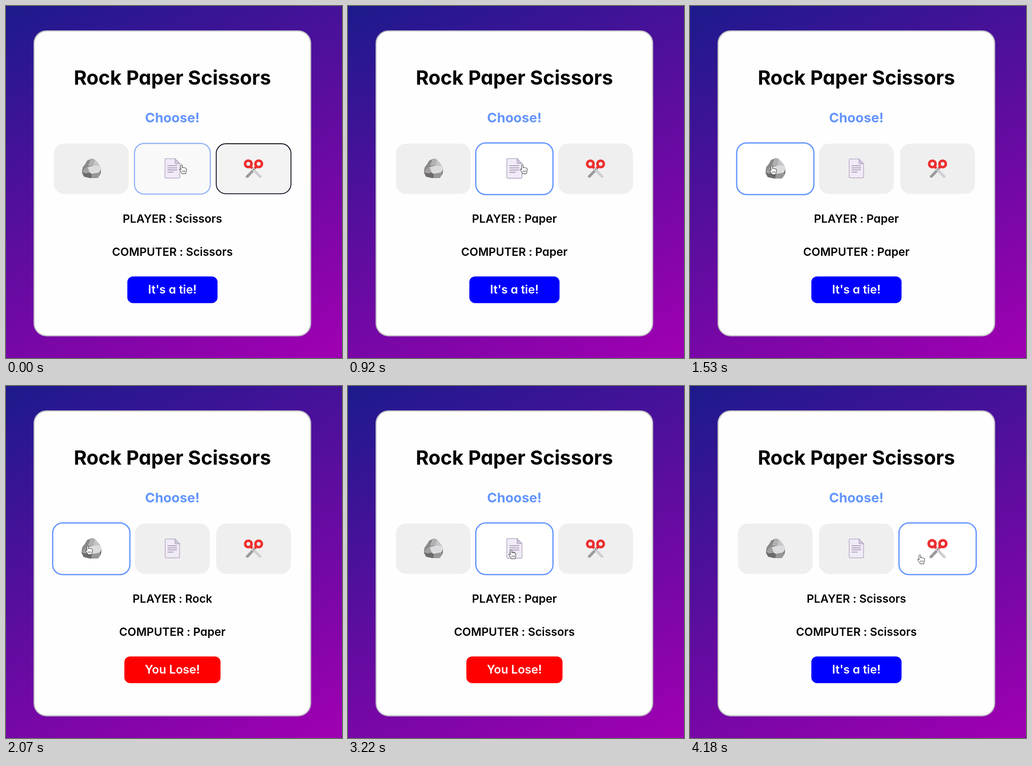
An HTML page for the animation above (5250 ms loop, 732 by 765 pixels).

```html
<!DOCTYPE html>
<html lang="en">
<head>
<meta charset="utf-8">
<title>Rock Paper Scissors</title>
<style>
  html, body { margin: 0; width: 100%; height: 100%; overflow: hidden; }
  svg { display: block; width: 100%; height: 100%; }
  text {
    font-family: Inter, "Open Sans", sans-serif;
    font-optical-sizing: none;
    font-feature-settings: "cv11" 1, "calt" 0;
    font-weight: 600;
    font-size: 24.6px;
    text-anchor: middle;
  }
  .title { font-size: 42.9px; font-weight: 700; }
  .sub { font-size: 29.1px; font-weight: 700; fill: #6495ff; }
  .label { font-size: 25.4px; fill: #fff; }
</style>
</head>
<body>
<svg viewBox="0 0 732 765">
  <defs>
    <linearGradient id="bg" gradientUnits="userSpaceOnUse" x1="154" y1="-72" x2="578" y2="837">
      <stop offset="0" stop-color="#1c1a8d"/>
      <stop offset=".96" stop-color="#9c00b0"/>
    </linearGradient>
  </defs>
  <rect width="732" height="765" fill="url(#bg)"/>
  <rect x="61.3" y="54.3" width="602.3" height="662.3" rx="27" fill="#fefefe" stroke="#c4c4c8" stroke-width="2.6"/>
  <text class="title" x="362.5" y="171">Rock Paper Scissors</text>
  <text class="sub" x="362.5" y="253">Choose!</text>

  <g id="rock">
    <rect class="box"/>
    <g transform="translate(-185.8 -353.7)">
      <path fill="#6c6a6a" d="M165.500 362L167 351L173 343L177 336L187 331.500L193 333.500L204 346L207 355L206 365L200 373.500L183 374L170 371Z"/>
      <path fill="#8b8989" d="M167 351L173 343L177 336L183 333.500L178 347L168 358Z"/>
      <path fill="#a3a1a1" d="M166 361L168 357L178 348L182 362L173 364Z"/>
      <path fill="#b2b1b2" d="M178 348L184 333L187 331.500L193 333.500L190 347Z"/>
      <path fill="#c6c5c7" d="M193 333.500L204 346L190 347Z"/>
      <path fill="#dcdbde" d="M190 347L204 346L207 355L203 362L187 365L182 362L178 350Z"/>
      <path fill="#989696" d="M187 365L203 362L206 365L200 373.500L186 374Z"/>
    </g>
  </g>

  <g id="paper">
    <rect class="box"/>
    <g transform="translate(-362.5 -353.7)" stroke="#b6abc2" stroke-width="1.5">
      <path fill="#f1ebf8" d="M349 332.500H368L378.200 343V371.200Q378.200 373.400 376 373.400H349Q346.800 373.400 346.800 371.200V334.700Q346.800 332.500 349 332.500Z"/>
      <path fill="#d2c8dd" d="M368 332.500V341Q368 343 370 343H378.200Z"/>
      <path stroke="#988ca5" d="M352 347.300H372.500M352 351.800H372.500M352 356.300H372.500M352 361H365"/>
    </g>
  </g>

  <g id="scissors">
    <rect class="box"/>
    <rect id="ring" x="-80.5" y="-53.800" width="161" height="107.600" rx="21" fill="none" stroke="#141418" stroke-width="1.800"/>
    <g transform="translate(-539.4 -353.7)">
      <path fill="#9b9a9c" d="M540.500 351L544 355.500L527.500 373H523L522.500 369.500Z"/>
      <path fill="#d0cfd2" d="M538.300 351L535 355.500L551.500 373H556L556.500 369.500Z"/>
      <g fill="none" stroke="#ee2f2f" stroke-width="5.600">
        <circle cx="528" cy="343.200" r="7"/>
        <circle cx="550.400" cy="343.200" r="7"/>
        <path d="M531 347L536.500 352.500M547.500 347L542 352.500"/>
      </g>
      <circle cx="539.300" cy="355" r="1.500" fill="#77767a"/>
    </g>
  </g>

  <text id="player" x="362.5" y="470.500"></text>
  <text id="computer" x="362.5" y="542.500"></text>
  <rect id="badge" y="587.700" height="58" rx="12.500"/>
  <text id="result" class="label" x="362.5" y="625"></text>

  <g id="hand" stroke="#222" stroke-width="1" stroke-linejoin="round" stroke-linecap="round">
    <path fill="#fff" d="M-4.600 -8.300C-4.600 -10.700 -1 -10.700 -1 -8.300V-3.200C-.7 -4.800 2 -4.600 2.200 -2.900C2.600 -4.100 5 -3.900 5.200 -2.300C5.700 -3.300 7.400 -3 7.400 -1.300V3.500C7.400 5.500 6.200 6.800 6 9.500H-2.200C-2.600 6.800 -6.800 3.200 -7.600 .6C-8.200 -1.200 -6 -1.600 -4.600 .8Z"/>
    <path fill="none" stroke-width=".8" d="M-1 2.500V6M1.700 2.500V6M4.400 2.500V6"/>
  </g>
</svg>
<script>
const LOOP = 5250, FADE = 200;
const $ = id => document.getElementById(id);
const set = (el, attrs) => { for (const k in attrs) el.setAttribute(k, attrs[k]); };
const mix = (a, b, p) => a + (b - a) * p;
const blend = (a, b, p) => `rgb(${a.map((v, i) => Math.round(mix(v, b[i], p)))})`;
const clamp = x => Math.max(0, Math.min(1, x));

// cubic-bezier(.25, .1, .25, 1)
function ease(x) {
  if (x <= 0) return 0;
  if (x >= 1) return 1;
  const curve = (a, b, s) => 3 * a * s * (1 - s) ** 2 + 3 * b * s * s * (1 - s) + s ** 3;
  let lo = 0, hi = 1;
  for (let i = 0; i < 24; i++) {
    const mid = (lo + hi) / 2;
    if (curve(.25, .25, mid) < x) lo = mid; else hi = mid;
  }
  return curve(.1, 1, lo);
}

const GREY = [239, 239, 239], WHITE = [255, 255, 255], BLUE = [100, 149, 255];

// hover spans: [enter, leave]
const buttons = [
  { id: "rock", x: 185.8, spans: [[1248, 2440]] },
  { id: "paper", x: 362.5, spans: [[-72, 1230], [2440, 3652]] },
  { id: "scissors", x: 539.4, spans: [[-999, -92], [3655, 9999]] }
];

// pointer legs: start, end, target x, target y, power
const start = [385.5, 355];
const legs = [
  [40, 150, 383, 355, 1],
  [910, 1320, 180, 357, 2],
  [1320, 1440, 180.800, 357, 1],
  [2060, 2500, 357, 366, 3],
  [2500, 2570, 358, 366, 1],
  [3210, 3740, 490, 366, 2],
  [3740, 3900, 501, 367, 1],
  [4050, 4140, 503.500, 377, 1]
];

const rounds = [
  { at: 0, player: "Scissors", computer: "Scissors", tie: true },
  { at: 420, player: "Paper", computer: "Paper", tie: true },
  { at: 1670, player: "Rock", computer: "Paper", tie: false },
  { at: 2850, player: "Paper", computer: "Scissors", tie: false },
  { at: 4180, player: "Scissors", computer: "Scissors", tie: true }
];

for (const b of buttons) {
  b.el = $(b.id);
  b.box = b.el.querySelector(".box");
  set(b.box, { x: -80.1, y: -53.4, width: 160.2, height: 106.8, rx: 20.5, "stroke-width": 2.6 });
}

function drawButton(b, t) {
  const p = Math.max(...b.spans.map(([on, off]) =>
    ease((t - on) / FADE) * (1 - ease((t - off) / FADE))));
  set(b.el, { transform: `translate(${b.x} 353.7) scale(${1 + .05 * p})` });
  set(b.box, { fill: blend(GREY, WHITE, p), stroke: blend(GREY, BLUE, p) });
}

function pointer(t) {
  let [x, y] = start;
  for (const [from, to, nx, ny, power] of legs) {
    const p = clamp((t - from) / (to - from)) ** power;
    x = mix(x, nx, p);
    y = mix(y, ny, p);
  }
  return [x, y];
}

let shown;
function showRound(r) {
  if (r === shown) return;
  shown = r;
  $("player").textContent = `PLAYER : ${r.player}`;
  $("computer").textContent = `COMPUTER : ${r.computer}`;
  $("result").textContent = r.tie ? "It's a tie!" : "You Lose!";
  const w = r.tie ? 196.5 : 209.5;
  set($("badge"), { x: 362.6 - w / 2, width: w, fill: r.tie ? "#00f" : "#f00" });
}

function draw(t) {
  buttons.forEach(b => drawButton(b, t));
  set($("ring"), { visibility: t < 320 ? "visible" : "hidden" });
  set($("hand"), { transform: `translate(${pointer(t).join(" ")})` });
  showRound(rounds.filter(r => r.at <= t).pop());
}

const began = performance.now();
function tick() {
  draw((performance.now() - began) % LOOP);
  requestAnimationFrame(tick);
}
tick();
</script>
</body>
</html>
```
